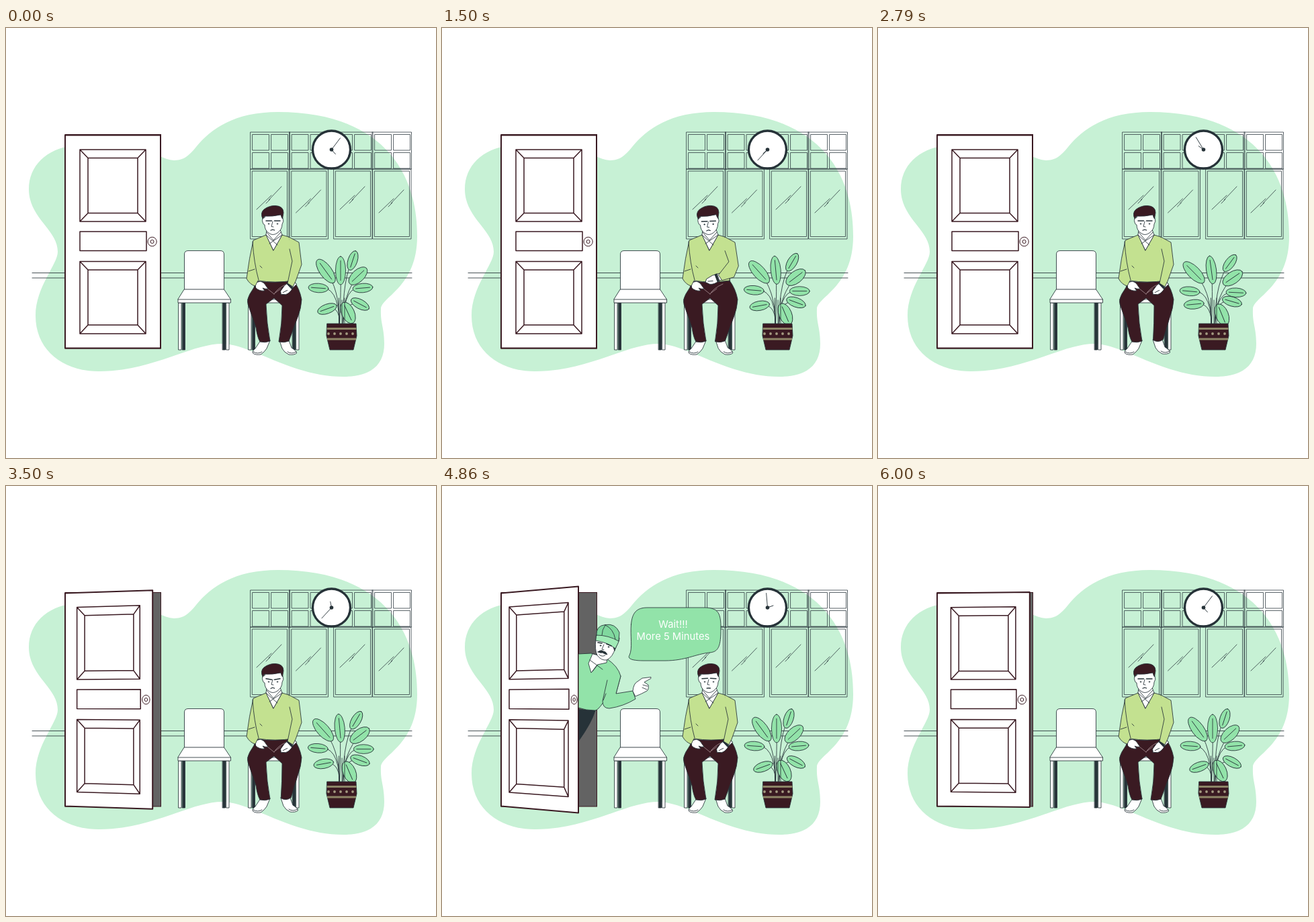
Recreate the animation shown at these times as an HTML page. Size 640 by 640 pixels, loop 6.07 s.

```html
<!DOCTYPE html>
<html lang="en">
<head>
<meta charset="utf-8">
<title>Waiting room</title>
<style>
  html, body { margin: 0; width: 100%; height: 100%; overflow: hidden; background: #fff; }
  svg { display: block; width: 100vw; height: 100vh; }
  text { font: 14.8px Inter, sans-serif; fill: #fff; text-anchor: middle; }
  .ink { stroke: #263238; stroke-width: .85; stroke-linejoin: round; stroke-linecap: round; }
  .no { fill: none; }
  .white { fill: #fff; }
  .dark { fill: #263238; }
  .brown { fill: #3a1a22; }
  .knit { fill: #c3e190; }
  .mint { fill: #92e3a9; }
  .door { fill: #fff; stroke: #3a1a22; stroke-width: 1.5; stroke-linejoin: round; }
</style>
</head>
<body>
<svg viewBox="0 0 640 640">
  <defs>
    <clipPath id="doorway"><rect x="203.5" y="100" width="240" height="400"/></clipPath>
    <clipPath id="wipe"><rect id="wipeBox" x="276" y="170" width="0" height="100"/></clipPath>
    <g id="chair" class="ink white">
      <path d="M265.500 389V337Q265.500 331.500 271 331.500H319Q324.500 331.500 324.500 337V389Z"/>
      <path d="M257 409H261V479H257ZM328 409H332V479H328Z"/>
      <path class="dark" d="M262.500 409H266.500V479H262.500ZM322.500 409H326.500V479H322.500Z"/>
      <path d="M265.500 389H324.500L334.500 404V409H256V404ZM256 404H334.500"/>
    </g>
  </defs>

  <path fill="#c7f1d5" d="M100 175C60 180 34 205 34 240C34 283 77 300 77 333C77 352 44 385 44 428C44 480 85 511 138 511C217 511 275 470 322 470C364 470 425 519 502 519C545 519 563 500 563 470C563 445 557 440 558 418C559 400 612 385 612 310C612 195 540 125 405 125C340 125 305 150 283 177C270 193 262 197 250 197C235 196 220 185 200 180Z"/>
  <path class="ink no" d="M39 364.500H604M39 372H604"/>
  <path id="window" class="ink no" style="stroke-width:.75"/>

  <circle cx="484.500" cy="181" r="28" fill="#fff" stroke="#263238" stroke-width="3.300"/>
  <path id="minute" class="ink" d="M484.500 181V159.500"/>
  <path id="hour" class="ink" d="M484.500 181V172"/>
  <circle class="dark" cx="484.500" cy="181" r="2.800"/>

  <rect x="88" y="158.500" width="142.500" height="318.500" fill="#636363" stroke="#3a1a22"/>
  <path id="slab" class="door" style="stroke-width:2"/>
  <path id="panels" class="door"/>
  <ellipse id="knob" class="door" cy="318" ry="6.800" style="stroke-width:1"/>
  <ellipse id="knobIn" class="door" cy="318" ry="2.600" style="stroke-width:1"/>

  <use href="#chair"/>

  <g clip-path="url(#doorway)">
    <g id="caller" class="ink">
      <path class="dark" d="M120 328L228 334Q223 352 203 380L120 420Z"/>
      <path class="mint" d="M120 250H203L222 249L245 257Q262 268 266 283L259 309L240 322Q232 334 228 334Q214 334 203 330H120Z"/>
      <path class="white" d="M224 250L218 264L222 278L231 266L245 263L246 256Z"/>
      <path class="no" d="M220 259L231 267L239 273M231 267L224 276"/>
      <path class="white" d="M229 229Q227 243 231 252Q237 260 245 259Q254 255 258 241L262 232Z"/>
      <path class="dark" d="M254 236L262 232L257 245Z"/>
      <path fill="#a0ebb6" d="M230 222Q246 215 264 226Q264 230 262 234L258 242Q247 233 229 230Z"/>
      <path fill="#80d89e" d="M230 222Q229 208 243 206.500Q258 204 264 218L263 231Q248 222 230 222Z"/>
      <path class="no" d="M243 207Q238 214 238 222M243 207Q255 212 258 228"/>
      <path class="no" style="stroke-width:1.700" d="M232 233L238 234M245 235L252 238"/>
      <path class="dark" d="M232 247Q237 243 240 246Q244 246 246 251Q241 250 239 248Q236 249 232 247Z"/>
      <path class="no" d="M241 236L238 243L241 244M234 251Q238 255 243 252"/>
      <circle class="dark" cx="236" cy="237.500" r=".8"/><circle class="dark" cx="248" cy="239.500" r=".8"/>
      <path class="mint" d="M246 289L239 320Q239 331 249 331Q270 328 288 317L284 305L259 309L266 283"/>
      <path class="white" d="M284 305Q285 294 291 291L298 286L311 284.500Q312 287 308 288L301 292L307 296Q308 303 305 305Q296 310 288 313Z"/>
      <path class="no" d="M299 296L306 298M298 300L305 303M244 309L240 319"/>
    </g>
  </g>

  <g clip-path="url(#wipe)">
    <path class="ink mint" d="M281.500 206C283 188 290 181 306 181H390C412 181 415 190 415 212C415 238 412 247 398 248C378 250 362 260 332 260H300C286 260 275 258 279 252C284 242 280 222 281.500 206Z"/>
    <text x="344" y="211">Wait!!!</text>
    <text x="344" y="229">More 5 Minutes</text>
  </g>

  <use href="#chair" x="104"/>
  <g class="ink">
    <path class="white" d="M379 465L371 477Q366 481 367.500 484Q371 487 379 486Q385 482 388 477L393 465Z"/>
    <path class="no" d="M368 482Q375 486 381 482"/>
    <g id="shoe">
      <path class="white" d="M407 465L411 477Q414 483 421 486Q429 487 432.500 484Q433 481 425 476L421 465Z"/>
      <path class="no" d="M432 482Q425 486 419 482"/>
    </g>
    <path id="pants" class="brown"/>
    <path class="no" style="stroke:#cdb8ba;stroke-width:.6" d="M399 396Q404 387 418 381M401 394L409 388M389 388L399 396"/>
    <path class="white" d="M371 379L379 377Q385 379 387 384L390 388Q386 389 382 387L385 391Q377 392 372 387Z"/>
    <path class="knit" d="M387 308L368 316Q362 342 358 373Q363 382 371 384L375 376Q400 380 428 376L430 345L421 311L411 308L398 331Z"/>
    <path class="no" d="M367 318Q369 350 376 375M361 362L370 359M378 354L381 357"/>
    <path class="white" d="M388 300L387 308L398 331L411 308L408 300Z"/>
    <path class="no" d="M387 308L404 323M411 308L392 321M388 304L398 316L409 304"/>
    <g id="hand">
      <path class="white" d="M0 -5L8 -5Q16 -8 22 -5L27 0L24 4L14 6L0 5Z"/>
      <path class="dark" d="M7 -5H10V6H7Z"/>
      <path class="no" d="M16 -2L23 0"/>
    </g>
    <path id="arm" class="knit"/>
    <g id="head">
      <path class="white" d="M385 282Q380 283 382 289Q383 293 385 293Q385 301 391 305Q397 310 404 305Q411 300 411 292Q414 288 412 283L408 275H386Z"/>
      <path class="brown" d="M382 284Q378 275 384 270Q392 264 401 264.500Q413 265 413 275L411.500 284Q410 282 409 278Q396 281 385 280Z"/>
      <g id="face">
        <path id="brows" class="no" style="stroke-width:1.500"/>
        <path class="no" d="M397 288L395 295.500L398 296"/>
        <path id="mouth" class="no"/>
        <circle class="dark" cx="391" cy="291.500" r=".7"/><circle class="dark" cx="404" cy="291.500" r=".7"/>
      </g>
    </g>
  </g>

  <path id="stems" class="ink no"/>
  <g id="leaves" class="ink mint"></g>
  <path class="ink no" d="M495.500 440V402M500 440V405M504 440V402"/>
  <path class="ink brown" d="M478 440H521L522 458L517 479H482L477 458Z"/>
  <path d="M477.500 447.500H521.500M478 463H521" stroke="#8d8567" stroke-width="3"/>
  <path d="M480 455H519" stroke="#a39a80" stroke-width="3.800" stroke-linecap="round" stroke-dasharray="0 9"/>
</svg>

<script>
const LOOP = 6070, FPS = 14;
const $ = id => document.getElementById(id);
const set = (id, attrs) => { for (const k in attrs) $(id).setAttribute(k, attrs[k]); };
const mix = (a, b, u) => a + (b - a) * u;
const part = (t, a, b) => Math.min(1, Math.max(0, (t - a) / (b - a)));
const smooth = (t, a, b) => { const u = part(t, a, b); return u * u * (3 - 2 * u); };
const easeOut = (t, a, b) => 1 - (1 - part(t, a, b)) ** 2;
const pulse = (t, a, b, c, d) => smooth(t, a, b) - smooth(t, c, d);
const poly = pts => 'M' + pts.map(p => p.join(' ')).join('L');
const box = (x, y, r, b) => `M${x} ${y}H${r}V${b}H${x}Z`;

// Window: four bays, each with four small panes, one tall pane and a glint
const bays = [364, 422.5, 488, 546];
$('window').setAttribute('d', box(364, 155, 603.5, 210) + 'M421.5 155V210M422.5 155V210M545 155V210M546 155V210' +
  bays.map((x, i) => {
    const g = 5 * (i % 2);
    let d = box(x, 210, x + 57, 314) + box(x + 2.7, 213, x + 54.5, 310.5);
    for (const px of [3, 31]) for (const y of [158.5, 185.5]) d += box(x + px, y, x + px + 24.5, y + 23.5);
    return d + `M${x + 9} ${270 + g}l22 -21M${x + 27} ${256 + g}l19 -20M${x + 23} ${261 + g}l6 -6`;
  }).join(''));

// Leaf: x, y, angle at rest; x, y, angle when swayed; half length, half width
const leaves = [
  [516, 346, -72, 524, 350, -53, 15, 7],
  [476, 362, 54, 470, 364, 45, 21, 9],
  [524, 369, -43, 528, 372, -34, 17, 9],
  [498, 361, -90, 496, 360, -98, 21, 7.5],
  [465, 387, 4, 464, 392, 5, 15, 6.8],
  [531, 387, -5, 533, 394, 3, 15, 6.8],
  [478, 418, -20, 470, 411, -5, 15, 7],
  [527, 411, 28, 527, 407, 16, 15, 7],
  [509, 424, 65, 512, 427, 68, 17, 9.5]
];
$('leaves').innerHTML = leaves.map(([,,,,,, l, w]) =>
  `<g><ellipse rx="${l}" ry="${w}"/><path d="M${-.7 * l} 0H${.7 * l}"/></g>`).join('');

function drawPlant(u) {
  let stems = '';
  leaves.forEach(([x, y, a, x2, y2, a2], i) => {
    const cx = mix(x, x2, u), cy = mix(y, y2, u);
    $('leaves').children[i].setAttribute('transform', `translate(${cx} ${cy}) rotate(${mix(a, a2, u)})`);
    stems += `M${cx} ${cy}Q${499 + (cx - 499) * .12} ${cy + (cy < 380 ? 25 : -6)} ${496.5 + (cx > 499 ? 5 : 0)} 440`;
  });
  set('stems', { d: stems });
}

function drawDoor(open) {
  const width = mix(142, 115, open);
  const px = x => mix(x, 100 + (x - 110) * 88 / 98, open);
  const at = (x, y) => [x, 318 + (y - 318) * (1 + .063 * open * (x - 88) / width)];
  const quad = (x, y, r, b) => [at(x, y), at(r, y), at(r, b), at(x, b)];
  const panel = (...c) => quad(px(c[0]), c[1], px(c[2]), c[3]);
  set('slab', { d: poly(quad(88, 159.5, 88 + width, 476.5)) + 'Z' });
  let d = poly(panel(110, 303, 209, 331.5)) + 'Z';
  for (const [y, b, iy, ib] of [[181, 288, 193.5, 275.5], [347.5, 455, 360, 442]]) {
    // The far bevel narrows as the door turns
    const outer = panel(110, y, 208, b), inner = panel(122, iy, 196 + 5 * open, ib);
    d += poly(outer) + 'Z' + poly(inner) + 'Z' + outer.map((p, i) => poly([p, inner[i]])).join('');
  }
  set('panels', { d });
  const cx = px(217.6), squash = 1 - .32 * open;
  set('knob', { cx, rx: 6.6 * squash });
  set('knobIn', { cx, rx: 2.5 * squash });
}

const armDown = [[421, 311], [436, 319], [440, 352], [431, 377], [427, 385], [419, 380], [426, 347], [422, 329]];
const armUp = [[421, 311], [436, 319], [443, 357], [439, 363], [404, 364], [402, 352], [428, 349], [420, 335]];

function drawSitter(t) {
  const lift = pulse(t, 0, .6, 1.15, 1.8);
  const angry = pulse(t, 3.2, 3.8, 4.2, 4.6);
  const worried = pulse(t, 4.45, 4.8, 5.1, 5.5);
  const s = 3.5 * pulse(t, 1.36, 2, 3.3, 4.45);

  set('arm', { d: poly(armDown.map((p, i) => p.map((v, j) => mix(v, armUp[i][j], lift)))) });
  set('hand', { transform: `translate(${mix(429, 403, lift)} ${mix(378, 358, lift)}) rotate(${mix(137, 189, lift)})` });
  set('head', { transform: `rotate(${-4 * lift} 397 308)` });
  set('face', { transform: `translate(0 ${1.5 * lift})` });
  const inner = 287 + 2.3 * angry - .8 * worried, outer = 287 - .5 * angry - .3 * worried;
  const lip = 301 + .5 * angry, top = 299 - .5 * angry;
  set('brows', { d: `M387 ${outer}L395.5 ${inner}M399.500 ${inner}L408 ${outer}` });
  set('mouth', { d: `M394 ${lip}Q397 ${top} 400 ${lip}Q397 ${top + 3 * worried} 394 ${lip}` });

  set('shoe', { transform: `translate(${s * .6} ${-s * .3})` });
  set('pants', { d: `M375 377Q400 380 428 376Q437 388 440 404Q439 418 435 428L${421 + s} ${466 - s * .7}Q${414 + s} 469 ${406 + s} ${467 - s * .7}Q411 440 411 413L399 402L387 411Q388 440 393 466Q386 469 378 467Q374 460 372 446L360 411Q358 402 366 391Z` });
}

function draw(t) {
  const pivot = ' 484.5 181)';
  set('minute', { transform: `rotate(${37 + 360 * Math.min(1, (t % 1) / .97)}` + pivot });
  set('hour', { transform: `rotate(${139 + 60 * t}` + pivot });
  drawPlant(t < 5 ? (1 - Math.cos(t * Math.PI / 2.5)) / 2 : 0);
  drawDoor(easeOut(t, 3.2, 4.4) - smooth(t, 5.786, 6.071));
  drawSitter(t);
  const inside = 1 - easeOut(t, 3.5, 4.45) + smooth(t, 5.15, 5.75);
  set('caller', { transform: `translate(${-112 * inside} 0)` });
  set('wipeBox', { width: 142 * pulse(t, 3.85, 4.36, 5.15, 5.7) });
}

const start = performance.now();
function tick() {
  const ms = (performance.now() - start) % LOOP;
  // Steps start at times rounded to 10 ms
  draw(Math.min(84, Math.floor((ms + 5) * FPS / 1000)) / FPS);
  requestAnimationFrame(tick);
}
tick();
</script>
</body>
</html>
```
